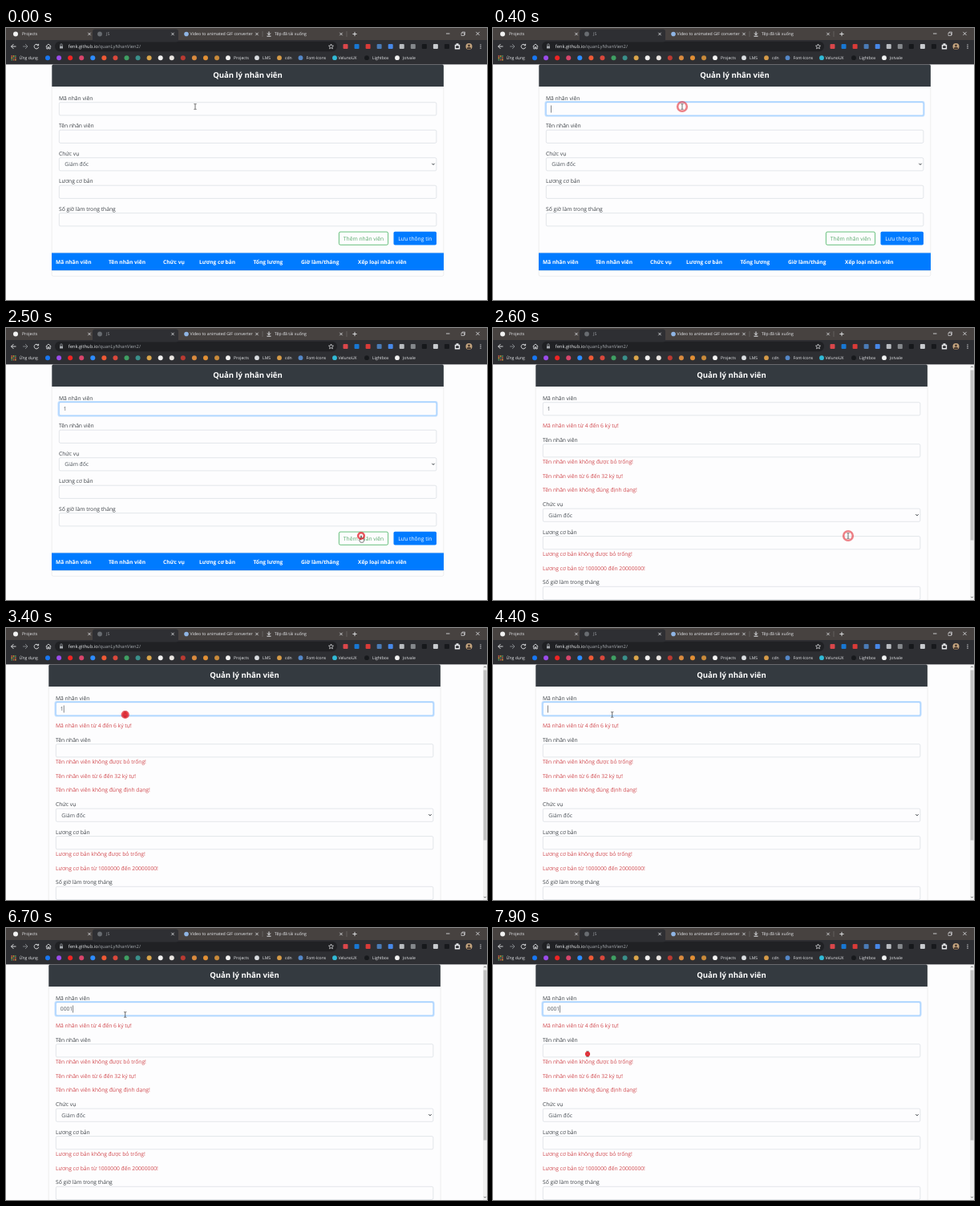
An HTML page with a canvas for the animation above (8 s loop, 600 px wide and 339 px high).

```html
<!DOCTYPE html>
<html lang="vi">
<head>
<meta charset="utf-8">
<title>Quản lý nhân viên</title>
<style>
  html, body { margin: 0; width: 100%; height: 100%; overflow: hidden; background: #fff; }
  canvas { display: block; width: 600px; height: 339px; }
</style>
</head>
<body>
<canvas id="stage"></canvas>
<script>
const W = 600, H = 339, LOOP = 8000, STEP = 100;
const FONT = '"Open Sans", "Noto Sans", sans-serif';
const PAGE = '#fdfdfe', INK = '#3c4146', RED = '#d0464b', BLUE = '#007bff', GREEN = '#28a745';
const canvas = document.getElementById('stage');
const ctx = canvas.getContext('2d');
const dpr = window.devicePixelRatio || 1;
canvas.width = Math.round(W * dpr);
canvas.height = Math.round(H * dpr);
ctx.textRendering = 'geometricPrecision';

// Drawing helpers
function text(str, x, y, size = 6.73, color = INK, weight = 400, align = 'left') {
  ctx.font = `${weight} ${size}px ${FONT}`;
  ctx.fillStyle = color;
  ctx.textAlign = align;
  ctx.fillText(str, x, y + size * 0.36);
  return ctx.measureText(str).width;
}
function rect(x, y, w, h, color) {
  ctx.fillStyle = color;
  ctx.fillRect(x, y, w, h);
}
function box(x, y, w, h, r, fill, stroke, width = 0.7) {
  ctx.beginPath();
  ctx.roundRect(x, y, w, h, r);
  if (fill) { ctx.fillStyle = fill; ctx.fill(); }
  if (stroke) { ctx.strokeStyle = stroke; ctx.lineWidth = width; ctx.stroke(); }
}
function dot(x, y, r, color) {
  ctx.beginPath();
  ctx.arc(x, y, r, 0, 7);
  ctx.fillStyle = color;
  ctx.fill();
}
function path(d, color, width = 1, x = 0, y = 0) {
  ctx.save();
  ctx.translate(x, y);
  ctx.strokeStyle = color;
  ctx.lineWidth = width;
  ctx.stroke(new Path2D(d));
  ctx.restore();
}
function cross(x, y, r, color) {
  path(`M${-r} ${-r}L${r} ${r}M${r} ${-r}L${-r} ${r}`, color, 0.8, x, y);
}

// Browser window
const BAR = '#2e2f33', STRIP = '#474240', PILL = '#202124', LIGHT = '#e8eaed', DIM = '#a5a9ae';

function drawTabs() {
  rect(0, 0, W, 15, STRIP);
  box(108, 1.5, 107, 16, 3, BAR);
  const tabs = [
    [20, 'Projects', 104, LIGHT], [125, 'JS', 208, DIM],
    [229.5, 'Video to animated GIF converter', 313, LIGHT],
    [335, 'Tệp đã tải xuống', 418, LIGHT]
  ];
  for (const [x, name, end, color] of tabs) {
    text(name, x, 7.5, 5.2, color);
    cross(end, 7.5, 1.7, LIGHT);
  }
  dot(12, 7.5, 3, '#f2f2f2');
  dot(117, 7.5, 2.9, '#686c71');
  dot(225, 7.5, 2.8, '#8fb4e3');
  path('M0-3V1M-2-1L0 1.2 2-1M-2.5 2.7H2.5', LIGHT, 1, 328, 7.5);
  path('M320 4V11M425 4V11', '#77726f', 0.6);
  path('M-2.6 0H2.6M0-2.6V2.6', LIGHT, 0.9, 435, 7.5);
  path('M549 7H553.5', LIGHT, 0.8);
  path('M568 6H571.5V9.5H568ZM569 6V5H572.5V8.5H571.5', LIGHT, 0.6);
  cross(588.5, 7, 2.1, LIGHT);
}

function drawToolbar() {
  rect(0, 15, W, 30.4, BAR);
  path('M3 0H-3M0-3L-3 0 0 3', LIGHT, 0.9, 9.5, 23);
  path('M-3 0H3M0-3L3 0 0 3', '#85888d', 0.9, 24, 23);
  path('M2.2-1.6A2.8 2.8 0 1 0 2.7 .8M2.6-3.2V-1.2H.6', LIGHT, 0.9, 38, 23);
  path('M-3.3 0L0-3 3.3 0M-2.2-.8V3H-.7V.8H.7V3H2.2V-.8', LIGHT, 0.8, 53, 23);

  box(61, 16.7, 352, 12.5, 6.2, PILL);
  rect(67, 22.5, 4, 3, DIM);
  path('M67.8 22.5V21A1.2 1.2 0 0 1 70.2 21V22.5', DIM, 0.7);
  const w = text('fenk.github.io', 77.7, 23, 5.75, LIGHT);
  text('/quanLyNhanVien2/', 77.7 + w, 23, 5.75, DIM);
  path('M0-3L.9-1 3-.8 1.4.7 1.9 2.8 0 1.7-1.9 2.8-1.4.7-3-.8-.9-1Z', LIGHT, 0.7, 405.5, 23);

  const tools = ['#d9474b', '#1877d2', '#d83b38', '#4a7bb5', '#4788e8', '#b9bcc0',
                 '#85888c', '#16181b', '#c9ccd0', '#17191c'];
  tools.forEach((c, i) => box(420.5 + i * 14.05, 20, 6, 6, 1, c));
  path('M-2.5-1.5H-.8V-3H.8V-1.5H2.5V2.7H-2.5Z', LIGHT, 1.4, 563, 23);
  dot(577.5, 23, 4, '#c3a47e');
  dot(577.5, 22, 1.4, '#46382f');
  box(575, 24, 5, 2.6, 1.2, '#46382f');
  for (let y = 20.8; y < 26; y += 2.2) dot(592, y, 0.65, LIGHT);
}

function drawBookmarks() {
  const apps = ['#e85b4b', '#f1b43c', '#50a565'];
  for (let i = 0; i < 9; i++) {
    rect(6.5 + i % 3 * 2.3, 34.3 + Math.floor(i / 3) * 2.3, 1.5, 1.5, apps[(i + Math.floor(i / 3)) % 3]);
  }
  text('Ứng dụng', 16.5, 37.2, 5.1, LIGHT);
  const marks = ['#1877f2', '#9b4bea', '#ed2424', '#d8456b', '#2d8cff', '#ee5a35', '#d9483c', '#3f9e62',
                 '#3a8f8a', '#d9a44a', '#f0f0f0', '#e9e4e0', '#b93a32', '#d98a3e', '#e18f35', '#c98a3a'];
  marks.forEach((c, i) => dot(52 + i * 14.07, 37.2, 3, c));
  const links = [
    [277, '#f2f2f2', 284, 'Projects'], [313, '#d9dce0', 320, 'LMS'],
    [341, '#d49a48', 348, 'cdn'], [367.5, '#5487c7', 374.5, 'Font-Icons'],
    [410, '#31b9d5', 414.5, 'VelunoUX'], [450, '#17191c', 457, 'Lightbox'],
    [488, '#f0f0f0', 495, 'Jotvale']
  ];
  for (const [x, color, tx, name] of links) {
    dot(x, 37.2, 2.9, color);
    text(name, tx, 37.2, 5.1, LIGHT);
  }
}

// Form
function field(x, y, focus = 0) {
  if (focus) {
    ctx.globalAlpha = focus;
    box(x - 1.5, y - 1.5, 474, 19.6, 2.8, '#bfdeff');
    ctx.globalAlpha = 1;
  }
  box(x + 0.3, y + 0.3, 470.6, 16.2, 1.7, PAGE, focus ? '#80bdff' : '#d0d6dc', 0.6);
}
function select(x, y) {
  field(x, y);
  text('Giám đốc', x + 7.3, y + 8.6, 6.73, '#495057');
  path('M-1.6-.8L0 .9 1.6-.8', '#343a40', 1, x + 467, y + 8.2);
}
function header(x) {
  box(x + 0.3, 45.6, 488.6, 27.3, [1.8, 1.8, 0, 0], '#343a40');
  text('Quản lý nhân viên', x + 244.5, 58.4, 9.55, '#fff', 700, 'center');
}

function firstField(x, s) {
  field(x, 92.4, s.focus);
  const w = text(s.value, x + 5.8, 101, 6.73, '#495057');
  if (s.caret) rect(x + 6 + w, 96.5, 0.6, 9, '#33383d');
}

function drawEmptyForm(s) {
  const x = 66;
  box(57.2, 45.5, 488.6, 263.8, 1.8, null, '#dfdfdf', 0.5);
  header(57);
  const labels = ['Mã nhân viên', 'Tên nhân viên', 'Chức vụ', 'Lương cơ bản', 'Số giờ làm trong tháng'];
  labels.forEach((label, i) => {
    const y = 87.2 + i * 34.5;
    text(label, x, y);
    if (i === 0) firstField(x, s);
    else if (i === 2) select(x, y + 5.2);
    else field(x, y + 5.2);
  });
  box(415.4, 254.1, 61.2, 16.2, 1.8, PAGE, GREEN);
  text('Thêm nhân viên', 446, 262.5, 6.73, '#58a96b', 400, 'center');
  box(483.5, 253.8, 53.5, 16.8, 1.8, BLUE);
  text('Lưu thông tin', 510.3, 262.5, 6.73, '#fff', 400, 'center');

  rect(57, 279.7, 489, 0.8, '#dee2e6');
  rect(57, 280.4, 489, 21.6, BLUE);
  rect(57, 302, 489, 0.8, '#dee2e6');
  const columns = [[62, 'Mã nhân viên'], [128, 'Tên nhân viên'], [196, 'Chức vụ'], [241, 'Lương cơ bản'],
                   [308.5, 'Tổng lương'], [368, 'Giờ làm/tháng'], [439, 'Xếp loại nhân viên']];
  for (const [cx, name] of columns) text(name, cx, 291.6, 6.6, '#fff', 700);
}

function drawErrorForm(s) {
  const x = 62;
  box(53.2, 45.5, 489, 320, 1.8, null, '#dfdfdf', 0.5);
  header(53);
  text('Mã nhân viên', x, 87.2);
  firstField(x, s);
  text('Tên nhân viên', x, 139.3);
  field(x, 144.4);
  text('Chức vụ', x, 219.6);
  select(x, 224.8);
  text('Lương cơ bản', x, 254.2);
  field(x, 259.3);
  text('Số giờ làm trong tháng', x, 316.8);
  field(x, 322);
  const errors = [
    [121.7, 'Mã nhân viên từ 4 đến 6 ký tự!'],
    [166.9, 'Tên nhân viên không được bỏ trống!'],
    [184.4, 'Tên nhân viên từ 6 đến 32 ký tự!'],
    [202, 'Tên nhân viên không đúng định dạng!'],
    [281.7, 'Lương cơ bản không được bỏ trống!'],
    [299.3, 'Lương cơ bản từ 1000000 đến 20000000!']
  ];
  for (const [y, message] of errors) text(message, x, y, 6.73, RED);

  rect(595, 45, 5, 294, '#f1f1f1');
  rect(595.6, 52.5, 3.9, 212, '#c1c1c1');
  path('M-1.2.7L0-.7 1.2.7', '#555', 0.9, 597.5, 48.5);
  path('M-1.2-.7L0 .7 1.2-.7', '#555', 0.9, 597.5, 335.5);
}

// Pointer: [time, x, y], linear between points
const TRACK = [
  [0, 236, 98], [1100, 236, 98], [1200, 211, 109], [1300, 180.5, 121.5], [1700, 178, 125],
  [1800, 178, 125], [1900, 188, 130], [2100, 310, 192], [2300, 426, 250], [2400, 443, 259],
  [2800, 443, 259], [2900, 350, 211], [3000, 205, 136], [3100, 148.7, 108], [7200, 148.7, 108],
  [7400, 143, 135], [7600, 128, 178], [7700, 120, 168], [7800, 118, 157], [LOOP, 118, 157]
];
const CLICKS = [[200, 236, 98], [2400, 443, 259], [3300, 148.7, 108], [3400, 148.7, 108], [7900, 118, 157]];

function pointerAt(t) {
  const i = Math.max(1, TRACK.findIndex(p => p[0] >= t));
  const [t0, x0, y0] = TRACK[i - 1], [t1, x1, y1] = TRACK[i];
  const k = (t - t0) / (t1 - t0);
  return [x0 + (x1 - x0) * k, y0 + (y1 - y0) * k];
}

function pointerKind(x, y, errors) {
  const tops = errors ? [92, 144, 259, 322] : [92, 127, 196, 230];
  if (tops.some(top => y >= top && y <= top + 17)) return 'beam';
  if (!errors && x > 415 && y > 253 && y < 271) return 'hand';
  return 'arrow';
}

function drawPointer(t, errors) {
  const [x, y] = pointerAt(t);
  const kind = pointerKind(x, y, errors);
  if (kind === 'beam') {
    path('M-1.6-3.3H-.4L0-3 .4-3.3H1.6M0-3V3M-1.6 3.3H-.4L0 3 .4 3.3H1.6', '#333', 0.7, x, y);
    return;
  }
  const shape = kind === 'hand'
    ? 'M-.6 0H.5V3L3.5 3.8V6.5L2.5 8.2H-.8L-2.7 5.2-1.8 4.5-.6 5.2Z'
    : 'M0 0V7L1.6 5.6 2.7 8 3.8 7.5 2.7 5.2H4.8Z';
  ctx.save();
  ctx.translate(x, y);
  ctx.fillStyle = '#fff';
  ctx.fill(new Path2D(shape));
  ctx.restore();
  path(shape, '#222', 0.6, x, y);
}

function drawClicks(t) {
  for (const [start, x, y] of CLICKS) {
    const age = (t - start) / STEP;
    if (age < 0 || age >= 5) continue;
    ctx.beginPath();
    ctx.arc(x, y, 1.8 + age * 2, 0, 7);
    ctx.strokeStyle = `rgba(225, 30, 40, ${0.92 - age * 0.18})`;
    ctx.lineWidth = 2.6;
    ctx.stroke();
  }
}

// Typing: [time, value, caret]
const TYPING = [
  [0, '', 0], [300, '', 1], [1000, '1', 1], [1500, '1', 0], [2000, '1', 1], [2500, '1', 0],
  [3300, '1', 1], [3800, '1', 0], [4100, '', 0], [4400, '', 1], [4800, '0', 1], [4900, '00', 1],
  [5100, '000', 1], [5700, '000', 0], [6200, '00', 1], [6700, '0001', 1], [7300, '0001', 0], [7800, '0001', 1]
];

function focusAt(t) {
  if (t < 200 || (t >= 2600 && t < 3300)) return 0;
  const since = t - (t < 2600 ? 200 : 3300);
  return Math.min(1, 0.4 + since / 160);
}

function draw(t) {
  const [, value, caret] = TYPING.findLast(k => k[0] <= t);
  const state = { value, caret, focus: focusAt(t) };
  const errors = t >= 2600;
  ctx.setTransform(dpr, 0, 0, dpr, 0, 0);
  rect(0, 0, W, H, PAGE);
  if (errors) drawErrorForm(state);
  else drawEmptyForm(state);
  drawToolbar();
  drawTabs();
  drawBookmarks();
  drawPointer(t, errors);
  drawClicks(t);
}

const begin = performance.now();
function tick() {
  const t = (performance.now() - begin) % LOOP;
  draw(Math.floor(t / STEP) * STEP);
  requestAnimationFrame(tick);
}
tick();
</script>
</body>
</html>
```
